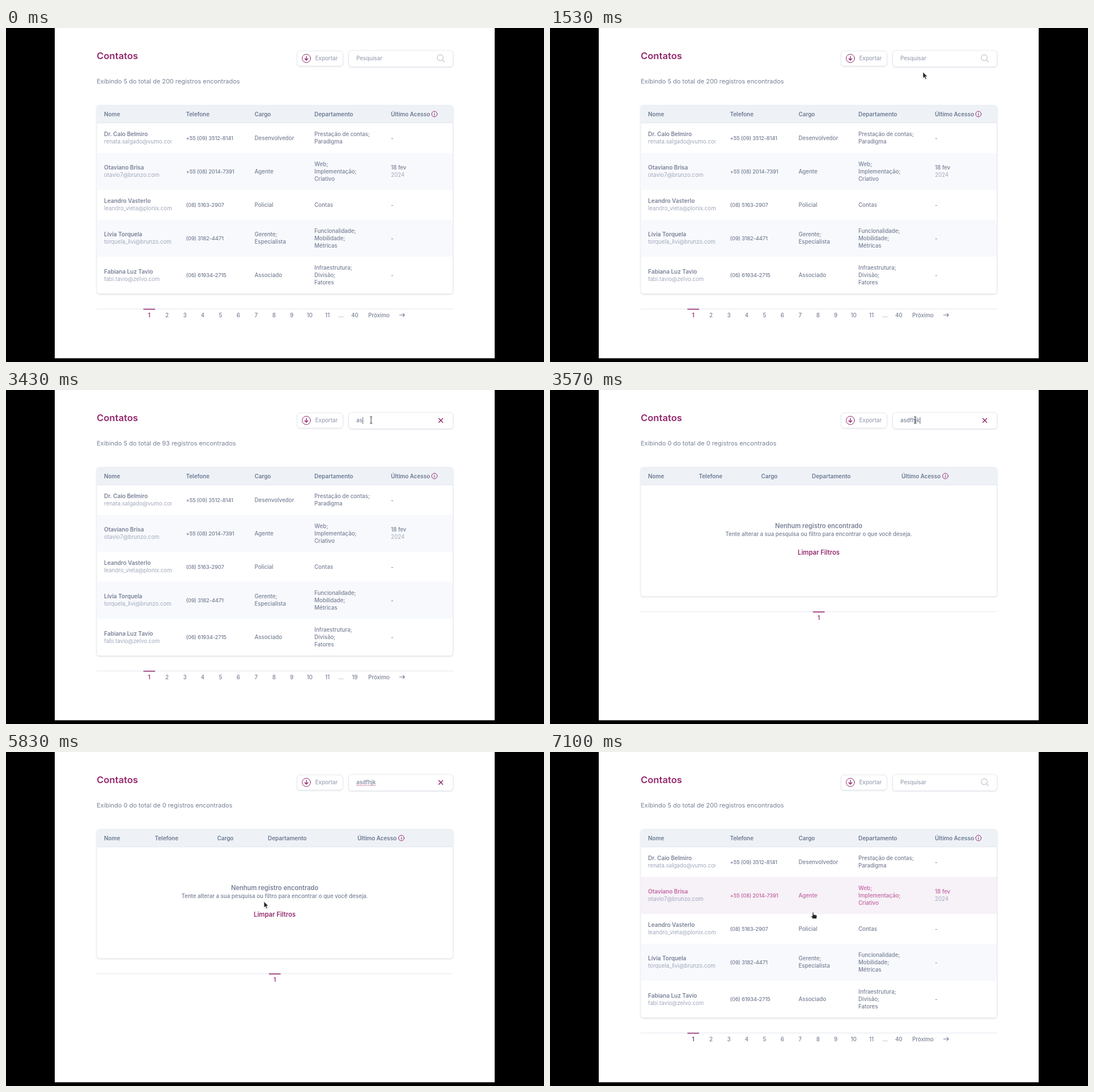
Recreate the animation shown at these times as an HTML page. Size 949 by 590 pixels, loop 8000 ms.

```html
<!DOCTYPE html>
<html lang="pt-BR">
<head>
<meta charset="utf-8">
<title>Contatos</title>
<style>
  html, body { margin: 0; width: 100%; height: 100%; overflow: hidden; background: #000; }
  svg { display: block; width: 100vw; height: 100vh; }
  text { font-family: Inter, "Open Sans", sans-serif; font-size: 9.7px; font-weight: 500; }
  .bold { font-weight: 600; }
  .head { font-weight: 600; font-size: 9.9px; fill: #6b7890; }
  .name { font-weight: 600; font-size: 10px; }
  .phone { font-size: 9.5px; letter-spacing: -.25px; }
  .soft { fill: #a1a8bc; font-weight: 400; }
  .hint { fill: #9da2b4; }
  .mid { text-anchor: middle; }
  .plum { fill: #93296d; }
  .line { fill: none; stroke: #93296d; stroke-linecap: round; stroke-linejoin: round; }
</style>
</head>
<body>
<svg id="stage" viewBox="0 0 949 590"></svg>
<script>
const LOOP = 8000;
const GREY = [120, 128, 150], PINK = [192, 102, 160];

// Text is placed by its visual middle line.
const text = (x, y, s, cls = '', extra = '') =>
  `<text x="${x}" y="${y + 3.5}" class="${cls}" ${extra}>${s}</text>`;
const box = (x, y, w, h, fill, extra = '') =>
  `<rect x="${x}" y="${y}" width="${w}" height="${h}" fill="${fill}" ${extra}/>`;
const panel = (x, y, w, h) =>
  box(x, y, w, h, '#fff', 'rx="5" stroke="#e4e8ee" stroke-width=".8" filter="url(#shade)"');

const lines = (x, y, list, cls) =>
  list.map((s, i) => text(x, y + (i - (list.length - 1) / 2) * 13.1, s, cls)).join('');

const titles = ['Nome', 'Telefone', 'Cargo', 'Departamento', 'Último Acesso'];
const wide = [173, 317.5, 438.5, 544, 679];
const tight = [173, 262.5, 372.5, 462, 620];

const rows = [
  ['Dr. Caio Belmiro', 'renata.salgado@vumo.com.br', '+55 (09) 3512-8141',
    ['Desenvolvedor'], ['Prestação de contas;', 'Paradigma']],
  ['Otaviano Brisa', 'otavio7@brunzo.com', '+55 (08) 2014-7391',
    ['Agente'], ['Web;', 'Implementação;', 'Criativo'], ['18 fev', '2024']],
  ['Leandro Vasterlo', 'leandro_vieta@plonix.com.br', '(08) 5163-2907',
    ['Policial'], ['Contas']],
  ['Lívia Torquela', 'torquela_livi@brunzo.com.br', '(09) 3182-4471',
    ['Gerente;', 'Especialista'], ['Funcionalidade;', 'Mobilidade;', 'Métricas']],
  ['Fabiana Luz Tavio', 'fabi.tavio@zelvo.com', '(06) 61934-2715',
    ['Associado'], ['Infraestrutura;', 'Divisão;', 'Fatores']]
];
const tops = [168, 220.5, 286, 338.5, 404, 469];

function card(bottom, cols, iconX) {
  return panel(160, 136.5, 628.5, bottom - 136.5) +
    '<path d="M160 168V141.5q0-5 5-5H783.5q5 0 5 5V168Z" fill="#eef2f7"/>' +
    box(160, 167.3, 628.5, .9, '#e1e6ed') +
    titles.map((s, i) => text(cols[i], 152, s, 'head')).join('') +
    `<g class="line"><circle cx="${iconX}" cy="152" r="4.9"/>` +
    `<path d="M${iconX} 151.5v2.8M${iconX} 149.5v.1" stroke-width="1.1"/></g>`;
}

function row([name, mail, phone, job, unit, seen], i) {
  const top = tops[i], h = tops[i + 1] - top, y = top + h / 2;
  const back = i % 2 ? box(160.4, top, 627.8, h, '#f7f9fc', `id="back${i}"`) : '';
  const date = seen
    ? text(wide[4], y - 6.5, seen[0]) + text(wide[4], y + 6.5, seen[1], 'soft')
    : text(wide[4], y, '-');
  return `<g id="row${i}">${back}` +
    text(wide[0], y - 6.5, name, 'name') +
    text(wide[0], y + 6.5, mail, 'soft', 'clip-path="url(#mail)"') +
    text(wide[1], y, phone, 'phone') +
    lines(wide[2], y, job) + lines(wide[3], y, unit) + date + '</g>';
}

function pager(y, x) {
  return box(160, y - .5, 628.5, 1, '#e3e7ed') +
    box(x - 10.2, y - .4, 20.6, 1.6, '#93296d') + text(x, y + 11.2, '1', 'mid bold plum');
}

const pages = Array.from({ length: 10 }, (_, i) =>
  text(284 + i * 31.45, 507, i + 2, 'mid')).join('');

document.getElementById('stage').innerHTML = `
  <defs>
    <filter id="shade" x="-5%" y="-15%" width="110%" height="140%">
      <feDropShadow dx="0" dy="1" stdDeviation="1" flood-color="#52617a" flood-opacity=".2"/>
    </filter>
    <clipPath id="mail"><rect x="172" y="168" width="120" height="302"/></clipPath>
  </defs>
  <rect width="949" height="590"/>
  ${box(86, 0, 776, 583.4, '#fff')}
  <g fill="rgb(${GREY})">
    <text x="160" y="55" class="bold plum" style="font-size:16.6px">Contatos</text>
    <text id="count" x="160" y="97.5" style="font-size:10.97px;font-weight:400"></text>
    ${panel(513.7, 40.5, 80.3, 26.5)}
    <g class="line"><circle cx="529.8" cy="53.7" r="7.4"/>
      <path d="M529.8 50.3v6.5m-2.8-2.7 2.8 2.8 2.8-2.8" stroke-width="1.4"/></g>
    ${text(545.5, 53.7, 'Exportar', 'hint')}
    ${panel(604.5, 39.8, 184, 28.4)}
    <g id="idle">
      ${text(618, 53.7, 'Pesquisar', 'hint')}
      <path d="M771.3 52.4a5.3 5.3 0 1 1-10.6 0a5.3 5.3 0 1 1 10.6 0M770 56.3l3.6 3.7"
        fill="none" stroke="#bfc1c9" stroke-width="1.1"/>
    </g>
    <g id="busy">
      ${text(618, 53.7, '', '', 'id="query"')}
      <path d="M763.4 50.3l7 7m0-7l-7 7" class="line" stroke-width="1.5"/>
      <path id="spell" d="M618 59.2h34" stroke="#d0527c" stroke-width="1.3" stroke-dasharray="1.6 1.3"/>
    </g>
    <rect id="caret" y="48" width=".9" height="12" fill="#555a70"/>
    <g id="full">
      ${card(469.5, wide, 755.8)}
      ${rows.map(row).join('')}
      ${pager(496.3, 252.6)}${pages}
      ${text(591, 507, '...', 'mid')}${text(615.3, 507, '', 'mid', 'id="last"')}
      ${text(639, 507, 'Próximo')}
      <path d="M693.8 507h9.2m-3.2-3.2 3.2 3.2-3.2 3.2" fill="none" stroke="#727a91" stroke-width="1.1"/>
    </g>
    <g id="none">
      ${card(364.7, tight, 697.4)}
      <text x="474" y="244" class="mid bold" style="font-size:11.1px">Nenhum registro encontrado</text>
      <text x="474" y="258" class="mid" style="font-size:9.7px">Tente alterar a sua pesquisa ou filtro para encontrar o que você deseja.</text>
      <text x="474" y="291" class="mid bold plum" style="font-size:11.2px">Limpar Filtros</text>
      ${pager(391.7, 474)}
    </g>
  </g>
  <g id="pointer" filter="url(#shade)">
    <path id="arrow" d="M0 0V11L2.6 8.7 4.4 12.7 6.2 11.9 4.5 8H7.8Z"
      fill="#26262a" stroke="#fff" stroke-width=".7"/>
    <path id="beam" d="M-2.2-6Q0-6 0-4.5Q0-6 2.2-6M0-4.5V4.5M-2.2 6Q0 6 0 4.5Q0 6 2.2 6"
      fill="none" stroke="#55555c" stroke-width="1.1"/>
    <path id="hand" d="M-1 .5Q0-1 1 .5V4L5.5 5Q7 5.4 7 7L6 11.5H-.3L-3.5 7.5Q-3.7 5.7-1 7Z"
      fill="#26262a" stroke="#fff" stroke-width=".7"/>
  </g>`;

const el = id => document.getElementById(id);
const show = (id, on) => el(id).setAttribute('display', on ? 'inline' : 'none');
const put = (id, s) => { if (el(id).textContent !== s) el(id).textContent = s; };
const clamp = v => Math.max(0, Math.min(1, v));
const mix = (a, b, k) => `rgb(${a.map((v, i) => Math.round(v + (b[i] - v) * k))})`;

// time, x, y of the pointer
const path = [
  [570, 152, 66], [970, 626, 90], [1170, 640, 92], [1370, 640, 92],
  [1530, 658, 78], [1830, 644, 53], [5090, 644, 53], [5100, 644, 62],
  [5830, 455, 264], [5930, 455, 265], [6330, 464, 283]
];
const keyTimes = [3230, 3330, 3460, 3490, 3520, 3545, 3570];
const caretOn = [[1970, 2570], [3170, 4200], [4800, 5400], [6000, 6600]];
const CLEAR = 6770, EMPTY = 3570;

function pointerAt(t) {
  const i = path.findIndex(p => p[0] > t);
  if (i < 0) return path[path.length - 1].slice(1);
  if (i === 0) return path[0].slice(1);
  const a = path[i - 1], b = path[i];
  const u = 1 - (1 - (t - a[0]) / (b[0] - a[0])) ** 2;
  return [a[1] + (b[1] - a[1]) * u, a[2] + (b[2] - a[2]) * u];
}

function draw(t) {
  const empty = t >= EMPTY && t < CLEAR;
  const some = t >= 3400 && t < EMPTY;
  const typed = t < CLEAR ? 'asdfhjk'.slice(0, keyTimes.filter(k => t >= k).length) : '';
  const total = empty ? 0 : some ? 93 : 200;

  put('count', `Exibindo ${empty ? 0 : 5} do total de ${total} registros encontrados`);
  put('last', some ? '19' : '40');
  put('query', typed);
  show('full', !empty);
  show('none', empty);
  show('idle', !typed);
  show('busy', typed);
  show('spell', t >= 4600);
  show('caret', caretOn.some(([a, b]) => t >= a && t < b));
  el('caret').setAttribute('x', 618.3 + (typed ? el('query').getComputedTextLength() : 0));

  const hot = clamp((t - 6830) / 200);
  el('row1').setAttribute('fill', mix(GREY, PINK, hot));
  el('back1').setAttribute('fill', mix([247, 249, 252], [247, 241, 248], hot));

  const [x, y] = pointerAt(t);
  const beam = t > 1370 && y < 68, hand = y > 280;
  show('pointer', t >= 570);
  show('beam', beam);
  show('hand', hand);
  show('arrow', !beam && !hand);
  el('pointer').setAttribute('transform', `translate(${x.toFixed(2)} ${y.toFixed(2)})`);
}

const start = performance.now();
function tick() {
  draw((performance.now() - start) % LOOP);
  requestAnimationFrame(tick);
}
tick();
</script>
</body>
</html>
```
